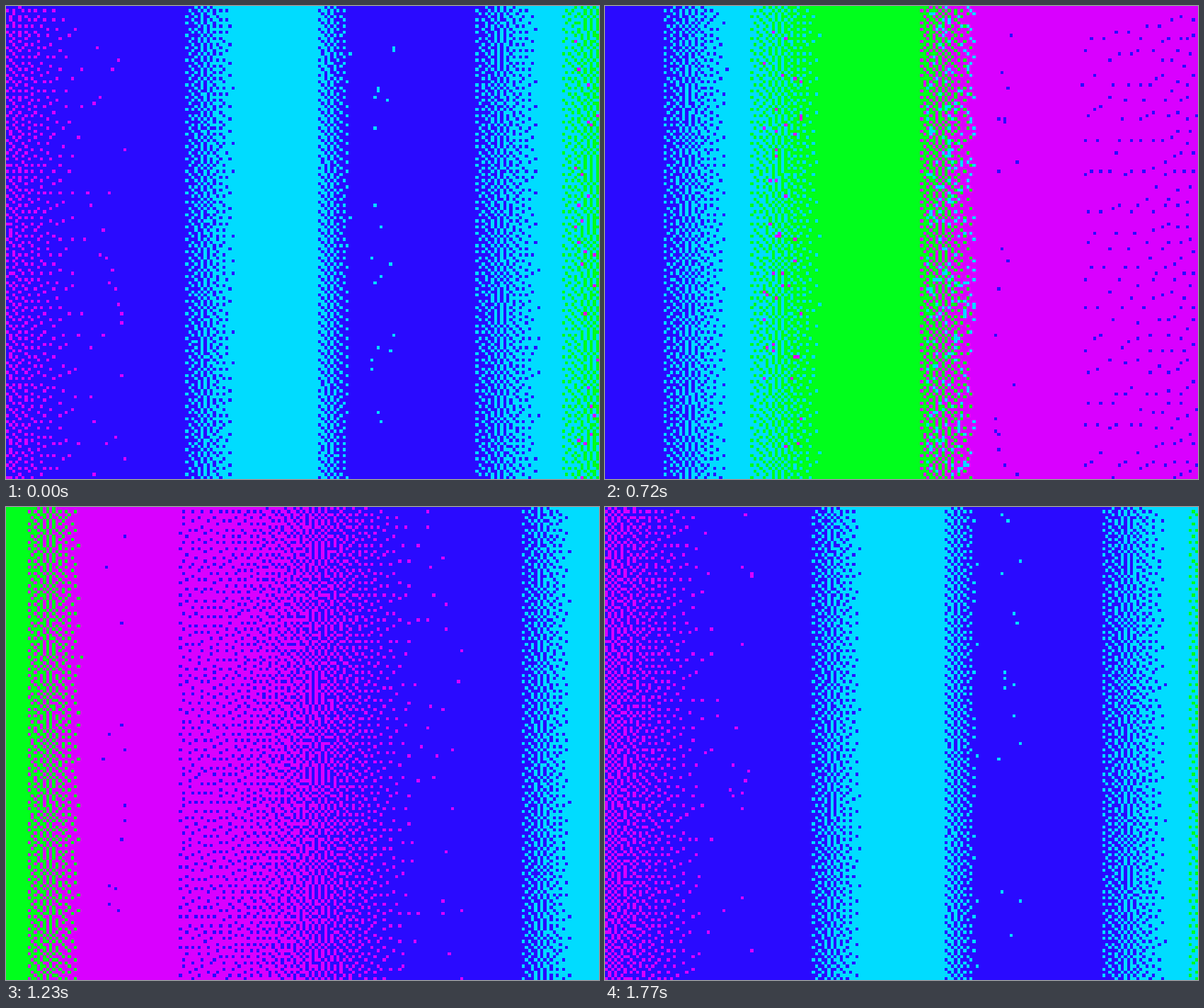
An HTML page with a canvas for the animation above (1800 ms loop, 838 by 668 pixels).

```html
<!DOCTYPE html>
<html lang="en">
<head>
<meta charset="utf-8">
<title>Dithered bands</title>
<style>
  html, body { margin: 0; width: 100%; height: 100%; overflow: hidden; background: #2a0aff; }
  canvas { display: block; width: 838px; height: 668px; image-rendering: pixelated; }
</style>
</head>
<body>
<canvas id="stage" width="192" height="153"></canvas>
<script>
const COLS = 192, ROWS = 153, CELL = 838 / COLS;
const LOOP = 1800, STEP = 30;
const LAP = 337 * CELL;        // width of the whole strip
const SPEED = 5.56;            // cells per step
const FIRST_SHARE = .15;       // every blend starts with a hard edge
const BLUE = 0, CYAN = 1, GREEN = 2, MAGENTA = 3;
const COLORS = [[42, 10, 255], [0, 220, 255], [0, 255, 28], [217, 0, 255]];

const linear = u => u;
const slowStart = u => { const v = u ** 1.4; return v * v * (3 - 2 * v); };

// Blends along the strip, in order.
const BANDS = [
  { from: BLUE, to: CYAN, x0: 250, x1: 328, ease: linear },
  { from: CYAN, to: BLUE, x0: 436, x1: 492, ease: linear },
  { from: BLUE, to: CYAN, x0: 657, x1: 760, ease: linear },
  { from: CYAN, to: GREEN, x0: 781, x1: 891, ease: linear },
  { from: GREEN, to: MAGENTA, x0: 1021, x1: 1107, ease: linear },
  { from: MAGENTA, to: BLUE, x0: 1235, x1: 1600, ease: slowStart }
];

// Stray dots scattered at random.
const STRAYS = [
  { color: CYAN, x0: 515, x1: 550, chance: .02 },
  { color: MAGENTA, x0: 805, x1: 860, chance: .02 },
  { color: CYAN, x0: 1035, x1: 1105, chance: .1, until: 38 },
  { color: BLUE, x0: 1132, x1: 1165, chance: .015 },
  { color: MAGENTA, x0: 1590, x1: 1640, chance: .01 }
];

const ctx = document.getElementById('stage').getContext('2d');
const image = ctx.createImageData(COLS, ROWS);
const clamp = u => Math.min(1, Math.max(0, u));

function seeded(seed) {
  let s = seed * 7919 + 1;
  return () => {
    s = s + 0x6D2B79F5 | 0;
    let t = Math.imul(s ^ s >>> 15, s | 1);
    t ^= t + Math.imul(t ^ t >>> 7, t | 61);
    return ((t ^ t >>> 14) >>> 0) / 4294967296;
  };
}

function columnAt(x, step) {
  x %= LAP;
  if (x < 170) x += LAP;
  const band = BANDS.findLast(b => x >= b.x0) || BANDS[0];
  const u = clamp((x - band.x0) / (band.x1 - band.x0));
  let share = x < band.x0 ? 0 : FIRST_SHARE + (1 - FIRST_SHARE) * band.ease(u);
  // The wide blend enters thinly and fills in.
  if (band.from === MAGENTA && step > 9) share *= .17 + .83 * clamp((step - 24) / 9);
  const weights = [0, 0, 0, 0];
  weights[band.from] = 1 - share;
  weights[band.to] = share;
  return {
    weights,
    to: band.to,
    grain: (band.x1 - band.x0) / 1000,   // wider blends look rougher
    stray: STRAYS.find(s => x >= s.x0 && x < s.x1 && step < (s.until ?? Infinity))
  };
}

// Error diffusion on the colour shares.
function draw(step) {
  const random = seeded(step);
  const shift = Math.round(SPEED * step);
  const columns = Array.from({ length: COLS }, (_, c) => columnAt((c + shift + .5) * CELL, step));
  let row = new Float32Array((COLS + 2) * 4);
  let next = new Float32Array(row.length);
  for (let y = 0; y < ROWS; y++) {
    const rowNoise = random() - .5;
    columns.forEach(({ weights, to, grain, stray }, c) => {
      const at = (c + 1) * 4;
      const bias = grain * (rowNoise + random() - .5);
      const level = k => row[at + k] + (k === to ? bias : 0);
      let best = weights.findIndex(w => w > 0);
      for (let k = 0; k < 4; k++) {
        row[at + k] = weights[k] > 0 ? row[at + k] + weights[k] : 0;
        if (weights[k] > 0 && level(k) > level(best)) best = k;
      }
      for (let k = 0; k < 4; k++) {
        if (!weights[k]) continue;
        const err = weights[k] < 1 ? (row[at + k] - (k === best ? 1 : 0)) / 16 : 0;
        row[at + 4 + k] += err * 7;
        next[at - 4 + k] += err * 3;
        next[at + k] += err * 5;
        next[at + 4 + k] += err;
      }
      const shown = stray && random() < stray.chance ? stray.color : best;
      image.data.set([...COLORS[shown], 255], (y * COLS + c) * 4);
    });
    [row, next] = [next, row];
    next.fill(0);
  }
  ctx.putImageData(image, 0, 0);
}

let shownStep = -1;
function tick() {
  const step = Math.floor(performance.now() % LOOP / STEP);
  if (step !== shownStep) draw(shownStep = step);
  requestAnimationFrame(tick);
}
tick();
</script>
</body>
</html>
```
